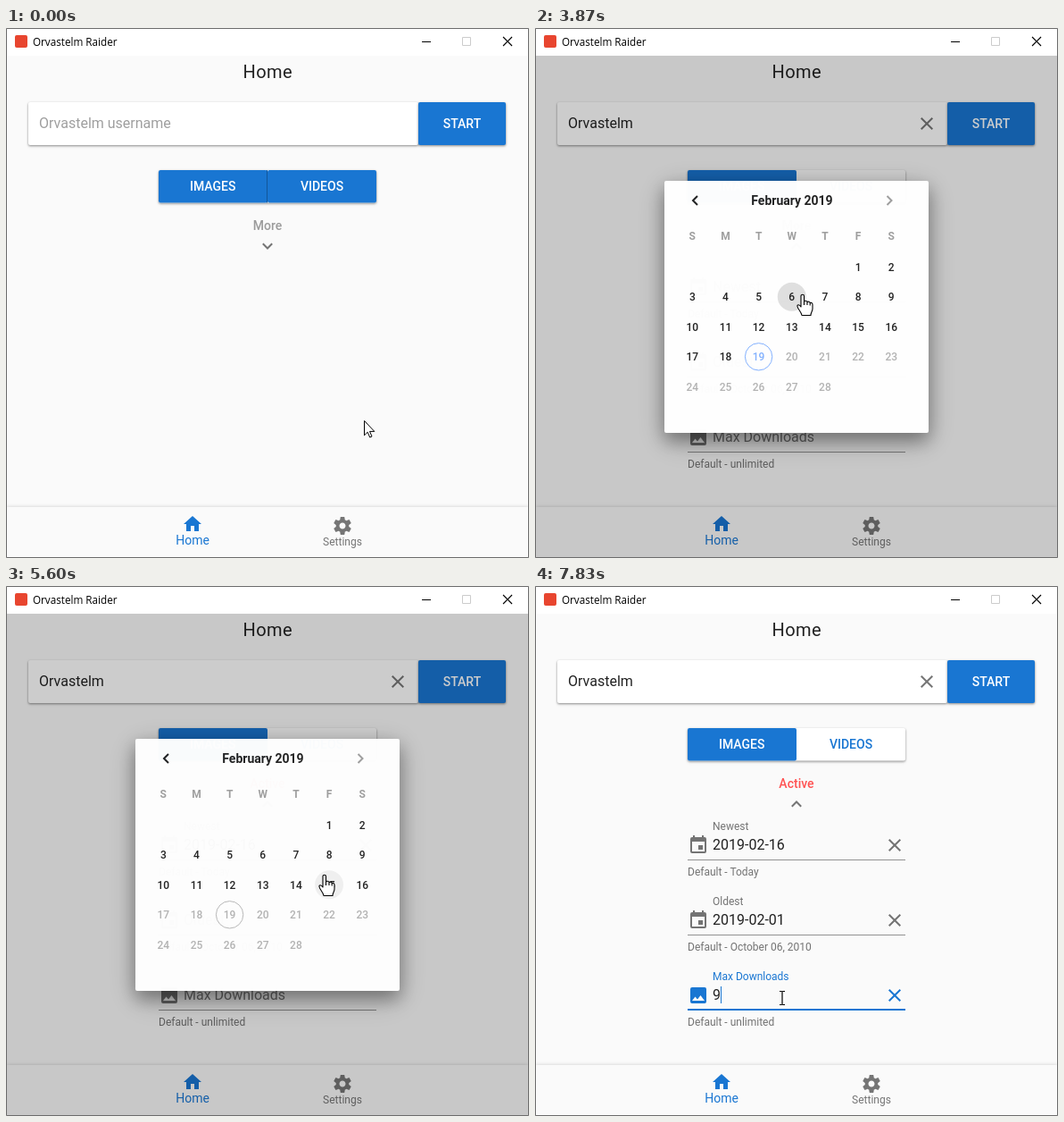
An HTML page that plays this animation: 586 px wide and 593 px high, repeating every 8000 ms.

```html
<!DOCTYPE html>
<html lang="en">
<head>
<meta charset="utf-8">
<title>Orvastelm Raider</title>
<style>
html, body { margin: 0; width: 100%; height: 100%; overflow: hidden; background: #fafafa; }
svg { display: block; width: 100%; height: 100%; font-family: Roboto, sans-serif; }
text { white-space: pre; }
.raised { filter: drop-shadow(0 1px 1px rgba(0,0,0,.32)) drop-shadow(0 1px 1.5px rgba(0,0,0,.16)); }
.nav { filter: drop-shadow(0 0 2px rgba(0,0,0,.18)); }
.sheet { filter: drop-shadow(0 9px 10px rgba(0,0,0,.35)) drop-shadow(0 6px 16px rgba(0,0,0,.18)); }
.mid { text-anchor: middle; }
.med { font-weight: 500; }
</style>
</head>
<body>
<svg id="stage" viewBox="0 0 586 593"></svg>
<script>
const LOOP = 8000;
const BLUE = '#1976d2', INK = 'rgba(0,0,0,.87)', SOFT = 'rgba(0,0,0,.54)', FAINT = 'rgba(0,0,0,.38)';
const NAME = 'Orvastelm';

const text = (x, y, s, size, fill, extra = '') =>
  `<text x="${x}" y="${y}" font-size="${size}" fill="${fill}" ${extra}>${s}</text>`;
const rect = (x, y, w, h, fill, extra = '') =>
  `<rect x="${x}" y="${y}" width="${w}" height="${h}" fill="${fill}" ${extra}/>`;
const line = (d, stroke, width, extra = '') =>
  `<path d="${d}" fill="none" stroke="${stroke}" stroke-width="${width}" ${extra}/>`;
const cross = (id, x, y) =>
  line('M-6.3-6.3L6.3 6.3M6.3-6.3L-6.3 6.3', SOFT, 2, `id="${id}" transform="translate(${x} ${y})"`);

const EVENT = 'M17 12h-5v5h5zM16 1v2H8V1H6v2H5a2 2 0 0 0-2 2v14a2 2 0 0 0 2 2h14a2 2 0 0 0 2-2V5a2 2 0 0 0-2-2h-1V1zM19 19H5V8h14z';
const IMAGE = 'M21 19V5a2 2 0 0 0-2-2H5a2 2 0 0 0-2 2v14a2 2 0 0 0 2 2h14a2 2 0 0 0 2-2zM8.5 13.5l2.5 3L14.5 12l4.5 6H5z';

function field(id, y, label, hint, icon) {
  return `<g transform="translate(171 ${y})">
    <path id="${id}Icon" d="${icon}" fill="${SOFT}" fill-rule="evenodd" transform="translate(0 -12)"/>
    ${text(0, 0, label, 16, SOFT, `id="${id}Label"`)}
    ${text(28, 5, '', 16, INK, `id="${id}Value"`)}
    ${cross(id + 'Clear', 232, 0)}
    ${rect(0, 16, 244, 1, 'rgba(0,0,0,.42)')}
    ${text(0, 34, 'Default - ' + hint, 12, SOFT)}
  </g>`;
}

function gear(x, y) {
  let s = `<g transform="translate(${x} ${y})" fill="#757575"><circle r="5.4" fill="none" stroke="#757575" stroke-width="3.8"/>`;
  for (let i = 0; i < 6; i++) s += `<path d="M-2.8-6.5L-2.2-10H2.2L2.8-6.5z" transform="rotate(${i * 60})"/>`;
  return s + '</g>';
}

const dayPos = d => [176.3 + 37.15 * ((d + 4) % 7), 267.3 + 33.5 * Math.floor((d + 4) / 7)];

function calendar() {
  let s = rect(145, 171, 296, 282, '#fff', 'rx="2" class="sheet"');
  s += text(288, 198, 'February 2019', 14, INK, 'class="mid" font-weight="700"');
  s += line('M182 188L177 193L182 198', INK, 2) + line('M394.5 188L399.5 193L394.5 198', FAINT, 2);
  [...'SMTWTFS'].forEach((c, i) =>
    s += text(176.3 + 37.15 * i, 237.3, c, 12, FAINT, 'class="mid" font-weight="600"'));
  for (let d = 1; d <= 28; d++) {
    const [x, y] = dayPos(d);
    s += `<circle id="spot${d}" cx="${x}" cy="${y}" r="16"/>`;
    s += text(x, y + 4.3, d, 12, INK, `id="day${d}" class="mid med"`);
  }
  const [x, y] = dayPos(19);
  return s + `<circle id="today" cx="${x}" cy="${y}" r="15.2" fill="none"/>`;
}

const stage = document.getElementById('stage');
stage.innerHTML = `
  <defs><clipPath id="fold"><rect id="foldBox" x="160" y="254" width="266" height="0"/></clipPath></defs>
  ${rect(0, 0, 586, 593, '#fafafa')}
  ${rect(0, 0, 586, 31, '#fff')}
  ${rect(10, 8, 14, 14, '#e8452f', 'rx="2"')}
  ${text(30, 20, NAME + ' Raider', 11.7, '#000', 'font-family="Open Sans, sans-serif"')}
  ${rect(466, 15, 10, 1, '#000')}
  ${line('M511.5 10.5h9v9h-9z', '#ccc', 1)}
  ${line('M557 10L567 20M567 10L557 20', '#000', 1.1)}
  ${text(293.2, 56, 'Home', 20, INK, 'class="mid" letter-spacing=".4"')}

  ${rect(25, 83, 437, 48, '#fff', 'rx="2" class="raised"')}
  ${text(37, 112, NAME + ' username', 16, FAINT, 'id="hint"')}
  ${text(37, 112, '', 16, INK, 'id="user"')}
  ${rect(37, 97, 1, 19, BLUE, 'id="caret"')}
  ${cross('userClear', 439, 107)}
  ${rect(462, 83, 98, 48, BLUE, 'rx="2" class="raised"')}
  ${text(511, 112, 'START', 14, '#fff', 'class="mid med"')}

  ${rect(171, 159, 244, 36.5, '#fff', 'rx="2" class="raised"')}
  ${rect(171, 159, 122, 36.5, BLUE, 'rx="2"')}
  ${rect(293, 159, 122, 36.5, BLUE, 'rx="2" id="videos"')}
  ${rect(292, 159, 1, 36.5, '#125699', 'id="split"')}
  ${text(231.7, 182, 'IMAGES', 14, '#fff', 'class="mid med"')}
  ${text(354, 182, 'VIDEOS', 14, '#fff', 'class="mid med" id="videosText"')}
  ${text(293, 226, 'More', 14, FAINT, 'class="mid med" id="more"')}
  ${line('M-5.2-2.7L0 2.5L5.2-2.7', '#757575', 2, 'id="chevron"')}

  <g clip-path="url(#fold)"><g id="panel">
    ${field('newest', 290, 'Newest', 'Today', EVENT)}
    ${field('oldest', 374, 'Oldest', 'October 06, 2010', EVENT)}
    ${field('max', 458, 'Max Downloads', 'unlimited', IMAGE)}
    ${rect(171, 473, 0, 2, BLUE, 'id="maxLine"')}
    ${rect(199, 448, 1, 19, BLUE, 'id="maxCaret"')}
  </g></g>

  ${rect(1, 536, 584, 56, '#fafafa', 'class="nav"')}
  <path d="M10 20v-6h4v6h5v-8h3L12 3 2 12h3v8z" fill="${BLUE}" transform="translate(197 543)"/>
  ${text(209, 578, 'Home', 14, BLUE, 'class="mid"')}
  ${gear(377, 557)}
  ${text(377, 579, 'Settings', 12, '#757575', 'class="mid"')}

  ${rect(1, 31, 584, 561, '#000', 'id="shade"')}
  <g id="dialog">${calendar()}</g>
  ${line('M.5.5h585v592h-585z', '#6b6b6b', 1)}

  <path id="arrow" d="M.5.5V16.8L4.2 13.2 6.7 19 9 18 6.5 12.4H11.8z" fill="#fff" stroke="#000"/>
  <g id="hand" stroke="#000" stroke-width="1.1" stroke-linejoin="round">
    <path d="M-2 2C-2-.4 1.5-.4 1.5 2V8C2 6.8 5 7 5 8.7 5.7 7.7 8.2 8 8.2 9.8 9 9 11 9.5 11 11.5V16C11 19 9 20 9 23.5H-1C-1.5 20-5.5 16.5-6 13.5-6.3 11.2-4 11-2 14z" fill="#fff"/>
    <path d="M1.5 8V12M5 9V12M8.2 10V12.5" fill="none"/>
  </g>
  ${line('M-3-7.5H-1L0-7 1-7.5H3M0-7V7M-3 7.5H-1L0 7 1 7.5H3', '#000', 1.2, 'id="beam"')}`;

const el = {};
stage.querySelectorAll('[id]').forEach(n => el[n.id] = n);
const set = (id, attrs) => { for (const k in attrs) el[id].setAttribute(k, attrs[k]); };
const show = (id, on) => set(id, { visibility: on ? 'visible' : 'hidden' });

const ramp = (t, start, len) => Math.min(1, Math.max(0, (t - start) / len));
const smooth = k => k * k * (3 - 2 * k);
const easeOut = k => 1 - (1 - k) ** 2;

// Pointer way points: time, x, y
const WAY = [
  [0, 401, 439], [600, 310, 99], [1650, 310, 99], [2050, 372, 178], [2560, 372, 178],
  [2820, 293, 234], [3080, 293, 234], [3400, 300, 298], [3900, 300, 298], [4450, 398, 334],
  [4680, 398, 334], [5000, 360, 371], [5200, 352, 374], [5380, 352, 374], [5600, 357, 323],
  [5900, 359, 270], [6250, 359, 270], [6730, 330, 407], [6980, 277, 461]
];
const SHAPES = [
  [0, 'arrow'], [480, 'beam'], [1830, 'arrow'], [1890, 'hand'], [2660, 'arrow'], [2720, 'hand'],
  [3180, 'arrow'], [3260, 'beam'], [3620, 'hand'], [4800, 'arrow'], [5230, 'beam'], [5420, 'hand'],
  [6930, 'beam']
];
const lastBefore = (list, t) => list.findLastIndex(e => e[0] <= t);

function pointer(t) {
  const i = Math.max(0, lastBefore(WAY, t));
  const a = WAY[i], b = WAY[i + 1] || a;
  const k = smooth(ramp(t, a[0], b[0] - a[0] || 1));
  return [a[1] + (b[1] - a[1]) * k, a[2] + (b[2] - a[2]) * k];
}

function drawPointer(t) {
  const [x, y] = pointer(t);
  const shape = SHAPES[lastBefore(SHAPES, t)][1];
  for (const id of ['arrow', 'hand', 'beam']) {
    show(id, id === shape);
    set(id, { transform: `translate(${Math.round(x)} ${Math.round(y)})` });
  }
}

function drawUser(t) {
  const typed = NAME.slice(0, Math.max(0, Math.floor((t - 930) / 75) + 1));
  const focused = t >= 640 && t < 2230;
  const lastKey = t < 930 ? 640 : Math.min(t, 1550);
  el.user.textContent = typed;
  show('hint', !typed);
  show('userClear', typed);
  set('userClear', { stroke: focused ? BLUE : SOFT });
  set('caret', { x: Math.round(37 + el.user.getComputedTextLength()) });
  show('caret', focused && (t - lastKey) % 1000 < 500);
}

function drawFilters(t) {
  const off = smooth(ramp(t, 2240, 250));
  const mix = c => Math.round(255 + (c - 255) * off);
  set('videos', { opacity: 1 - off });
  set('split', { opacity: 1 - off });
  set('videosText', { fill: `rgb(${mix(25)},${mix(118)},${mix(210)})` });

  const open = smooth(ramp(t, 2930, 370));
  const bounce = t < 2930 ? -2 + 2 * Math.cos(t / 868 * 2 * Math.PI) : 0;
  set('chevron', { transform: `translate(293 ${244 + bounce}) rotate(${180 * open})` });
  set('foldBox', { height: 250 * open });
  const active = t >= 4650;
  el.more.textContent = active ? 'Active' : 'More';
  set('more', { fill: active ? '#ff5252' : FAINT });
}

function drawField(id, value, lift, focused) {
  const k = smooth(lift), tint = focused ? BLUE : SOFT;
  el[id + 'Value'].textContent = value;
  set(id + 'Label', { fill: tint, transform: `translate(28 ${5 - 22 * k}) scale(${1 - .25 * k})` });
  set(id + 'Icon', { fill: tint });
  set(id + 'Clear', { stroke: tint });
  show(id + 'Clear', value);
}

function drawFields(t) {
  drawField('newest', t >= 4650 ? '2019-02-16' : '', ramp(t, 4650, 200), false);
  drawField('oldest', t >= 6230 ? '2019-02-01' : '', ramp(t, 6230, 200), false);
  const count = t < 7500 ? '' : t < 7730 ? '1' : String(Math.min(9, 3 + 2 * Math.floor((t - 7730) / 33)));
  const focused = t >= 7050;
  drawField('max', count, ramp(t, 7050, 250), focused);
  const w = 244 * smooth(ramp(t, 7050, 300));
  set('maxLine', { x: 293 - w / 2, width: w });
  set('maxCaret', { x: count ? 208 : 199 });
  show('maxCaret', focused && (t < 7500 ? (t - 7050) % 1000 < 500 : true));
}

function drawDialog(t) {
  const second = t >= 5260;
  const [open, close, clear, fade, pick, limit] = second
    ? [5260, 6260, 6700, 260, 1, 16]
    : [3520, 4680, 4970, 280, 16, 19];
  const inK = ramp(t, open, 400), outK = ramp(t, close, 270);
  const alpha = easeOut(inK) * (1 - smooth(outK));
  const size = .5 + .5 * easeOut(Math.min(1, inK * 1.5)) * (1 - smooth(outK));
  show('dialog', alpha > 0);
  set('dialog', { opacity: alpha, transform: `translate(293 312) scale(${size}) translate(-293 -312)` });
  set('shade', { opacity: .2 * smooth(ramp(t, open, 250)) * (1 - ramp(t, clear, fade)) });
  if (!alpha) return;

  const trail = [0, 50, 100, 150, 200, 250].map(d => pointer(t - d));
  for (let d = 1; d <= 28; d++) {
    const [x, y] = dayPos(d), on = d <= limit;
    const picked = d === pick && t >= close - 60;
    const near = trail.filter(p => Math.hypot(p[0] - x, p[1] - y) < 16).length / trail.length;
    set('spot' + d, { fill: picked ? BLUE : `rgba(0,0,0,${on ? .12 * near : 0})` });
    const ink = on ? INK : 'rgba(0,0,0,.3)';
    set('day' + d, { fill: picked ? '#fff' : d === 19 && !second ? '#82b1ff' : ink });
  }
  set('today', { stroke: second ? '#b8b8b8' : '#82b1ff' });
}

function draw(t) {
  drawUser(t);
  drawFilters(t);
  drawFields(t);
  drawDialog(t);
  drawPointer(t);
}

function tick() {
  draw(performance.now() % LOOP);
  requestAnimationFrame(tick);
}
tick();
</script>
</body>
</html>
```
